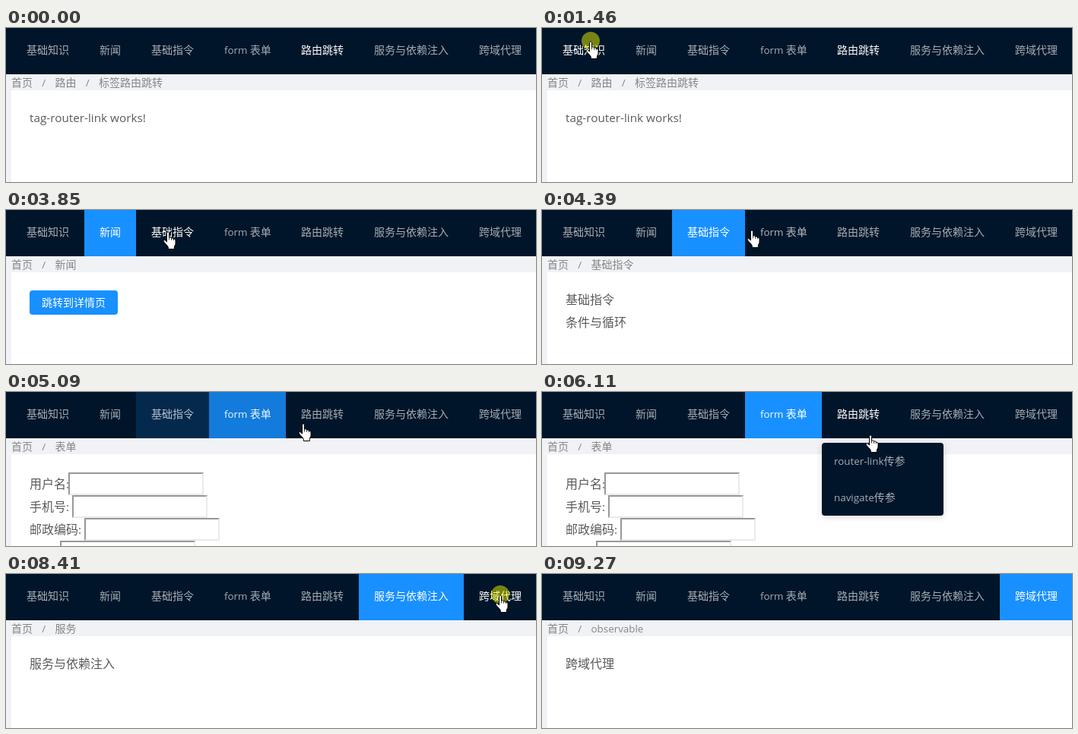
These frames come from a looping animation (697 by 203 pixels, 9.34 s). An HTML page:

```html
<!DOCTYPE html>
<html lang="zh-CN">
<head>
<meta charset="utf-8">
<title>路由跳转</title>
<style>
html, body { margin: 0; width: 100%; height: 100%; overflow: hidden; background: #f0f2f5; }
svg { display: block; }
text { font: 14px "Noto Sans CJK SC", "Noto Sans CJK", sans-serif; white-space: pre; }
.latin { font-family: "Open Sans", "Noto Sans", sans-serif; font-size: .957em; }
.crumb { fill: #000; fill-opacity: .45; }
.body { font-size: 16px; fill: #000; fill-opacity: .65; }
</style>
</head>
<body>
<svg id="stage" width="697" height="203" viewBox="0 0 697 203">
  <rect width="697" height="203" fill="#f0f2f5"/>
  <rect x="7" y="82" width="690" height="121" fill="#fff"/>
  <g id="pages"></g>
  <rect width="697" height="61" fill="#001529"/>
  <g id="menu"></g>
  <g id="drop">
    <rect x="368" y="67" width="160" height="96" rx="4" fill="#001529" style="filter:drop-shadow(0 2px 4px rgba(0,0,0,.15))"/>
  </g>
  <circle id="ring" r="12" fill="#ff0" fill-opacity=".47"/>
  <g id="cursor" fill="#fff" stroke="#000" stroke-width="1" stroke-linejoin="round">
    <g id="hand" transform="translate(-6.5 .3)">
      <path d="M5 2.2C5 .2 8 .2 8 2.2V8C9 7 11 7.4 11 9C12 8.2 13.8 8.6 13.8 10.2C15 9.6 16.5 10.2 16.5 11.8V16C16.5 18 14.8 19 14.8 21V23.2H6.8V21C6.8 19 3 16.5 1 13.6C-.2 11.6 1.8 10.6 3 11.8L5 13.8Z"/>
      <path d="M8 8V11M11 9V11.5M13.8 10.2V12" fill="none" stroke-width=".8"/>
    </g>
    <path id="arrow" d="M0 0V17L4 13.2 6.6 19 9 18 6.5 12.3H12Z"/>
  </g>
</svg>
<script>
const LOOP = 9340, FADE = 230;
const $ = id => document.getElementById(id);

const BURSTS = [
  [380, 1310, 13], [1390, 1850, 7], [2460, 2770, 5], [3310, 3460, 3],
  [3620, 4540, 13], [4690, 5470, 11], [5640, 5790, 2], [6110, 6570, 7],
  [6720, 7190, 7], [7420, 7490, 2], [7660, 7720, 2], [8030, 8260, 4], [8410, 9270, 12]
];

// Menu entries: label, left edge, hover span
const MENU = [
  ['基础知识', 7, 1080, 1690],
  ['新闻', 103, 1620, 3310],
  ['基础指令', 171, 3230, 4310],
  ['form 表单', 267, 4310, 5000],
  ['路由跳转', 368, 5090, 6900],
  ['服务与依赖注入', 464, 6950, 8070],
  ['跨域代理', 602, 8030, 8720]
];

// Selected entry from each time on
const SELECTED = [
  [-999, 4], [1500, 0], [2540, 1], [3900, 2], [4930, 3], [6860, 4], [7490, 5], [8540, 6]
];

// Pointer tip: time, x, y
const PATH = [
  [370, 376, 196], [1310, 64, 17], [1545, 64, 17], [1850, 134, 22],
  [3230, 134, 22], [3460, 213, 22], [3620, 213, 28], [4155, 213, 28],
  [4540, 310, 25], [4920, 310, 25], [5090, 392, 41], [5240, 434, 37],
  [6030, 434, 37], [6110, 432, 56], [6570, 430, 87], [6860, 430, 87],
  [7190, 507, 24], [7960, 507, 24], [8260, 650, 27], [8640, 650, 27], [9230, 672, 206]
];

const CLICKS = [
  [1390, 1460], [2460, 2530], [3690, 3840], [4690, 4840], [5640, 5785],
  [6720, 6860], [7420, 7485], [8410, 8480]
];

const el = (parent, tag, attrs) => {
  const node = document.createElementNS('http://www.w3.org/2000/svg', tag);
  for (const key in attrs) node.setAttribute(key, attrs[key]);
  return parent.appendChild(node);
};

const markup = s => s.replace(/[!-~]+(?: [!-~]+)*/g, m => `<tspan class="latin">${m}</tspan>`);

const label = (parent, str, x, y, attrs) => {
  const node = el(parent, 'text', { x, y, ...attrs });
  node.innerHTML = markup(str);
  return node;
};

const lines = (...rows) => g => rows.forEach((s, i) => label(g, s, 31, 124 + 30 * i, { class: 'body' }));

const newsPage = g => {
  el(g, 'rect', { x: 31, y: 106, width: 116, height: 32, rx: 4, fill: '#1890ff' });
  label(g, '跳转到详情页', 47, 127, { fill: '#fff' });
};

const field = (g, name, x, y) => {
  label(g, name, 31, y + 21, { class: 'body' });
  el(g, 'rect', { x, y, width: 178, height: 30, fill: '#eaeaea' });
  el(g, 'path', { d: `M${x} ${y}h178l-2 2H${x + 2}v26l-2 2z`, fill: '#989898' });
  el(g, 'rect', { x: x + 2, y: y + 2, width: 174, height: 26, fill: '#fff' });
};

const formPage = g => {
  field(g, '用户名:', 82, 106);
  field(g, '手机号:', 87, 136);
  field(g, '邮政编码:', 103, 166);
  field(g, '', 71, 196);
};

const tagPage = lines('tag-router-link works!');

// Start time, breadcrumb after the home link, content
const PAGES = [
  [0, ['路由', '标签路由跳转'], tagPage],
  [1535, ['基础知识'], lines('基础知识', '数据绑定、属性绑定、事件绑定与模板引用的写法', '组件的创建与使用')],
  [2530, ['新闻'], newsPage],
  [3910, ['基础指令'], lines('基础指令', '条件与循环')],
  [4840, ['表单'], formPage],
  [6870, ['路由', '标签路由跳转'], tagPage],
  [7650, ['服务'], lines('服务与依赖注入')],
  [8560, ['observable'], lines('跨域代理')]
].map(([start, trail, draw]) => {
  const g = el($('pages'), 'g', {});
  const crumb = el(g, 'text', { x: 7, y: 77, class: 'crumb' });
  const part = s => `<tspan dx="12.3">${markup(s)}</tspan>`;
  crumb.innerHTML = '首页' + trail.map(s => part('/') + part(s)).join('');
  draw(g);
  return { start, g };
});

const items = MENU.map(([name, x, from, to], i) => {
  const right = i < 6 ? MENU[i + 1][1] : 698;
  const bg = el($('menu'), 'rect', { x, y: 0, width: right - x, height: 61, fill: '#1890ff' });
  const text = label($('menu'), name, x + 20, 34, { fill: '#fff' });
  return { bg, text, from, to };
});

const linkItem = label($('drop'), 'router-link传参', 384, 96, { fill: '#fff' });
label($('drop'), 'navigate传参', 384, 144, { fill: '#fff', 'fill-opacity': .65 });

const clamp = v => Math.max(0, Math.min(1, v));
const ease = p => p < .5 ? 4 * p ** 3 : 1 - 4 * (1 - p) ** 3;
const ramp = (t, start, dur = FADE) => ease(clamp((t - start) / dur));
const span = (t, from, to) => ramp(t, from) - ramp(t, to);
const show = (node, on) => node.setAttribute('visibility', on ? 'inherit' : 'hidden');

function snap(t) {
  let held = 0;
  for (const [a, b, n] of BURSTS) {
    if (t < a) break;
    const dt = (b - a) / (n - 1);
    held = a + dt * Math.min(n - 1, Math.floor((t - a + 3) / dt));
  }
  return held;
}

function tip(t) {
  const i = PATH.findIndex(k => k[0] > t);
  if (i < 1) return null;
  const [a, x0, y0] = PATH[i - 1], [b, x1, y1] = PATH[i];
  let p = (t - a) / (b - a);
  p = p * p * (3 - 2 * p);
  return [Math.round(x0 + (x1 - x0) * p), Math.round(y0 + (y1 - y0) * p)];
}

function render(now) {
  const t = snap(now);

  const page = PAGES.filter(p => t >= p.start).pop();
  PAGES.forEach(p => show(p.g, p === page));

  items.forEach((item, i) => {
    let chosen = 0;
    SELECTED.forEach(([from, id], k) => {
      const to = k + 1 < SELECTED.length ? SELECTED[k + 1][0] : 2 * LOOP;
      if (id === i) chosen += span(t, from, to);
    });
    const white = Math.max(chosen, span(t, item.from, item.to));
    item.bg.setAttribute('fill-opacity', i === 4 ? 0 : chosen);
    item.text.setAttribute('fill-opacity', .65 + .35 * white);
  });

  const open = span(t, 5220, 6860);
  const scale = .8 + .2 * open;
  $('drop').setAttribute('opacity', open);
  $('drop').setAttribute('transform', `translate(0 ${67 * (1 - scale)}) scale(1 ${scale})`);
  linkItem.setAttribute('fill-opacity', .65 + .35 * ramp(t, 6330));

  const pos = tip(t);
  show($('cursor'), pos);
  show($('ring'), pos && CLICKS.some(([a, b]) => t >= a && t < b));
  if (pos) {
    const overMenu = pos[1] < 61 || (t > 5300 && t < 6930);
    show($('hand'), overMenu);
    show($('arrow'), !overMenu);
    $('cursor').setAttribute('transform', `translate(${pos})`);
    $('ring').setAttribute('transform', `translate(${pos})`);
  }
}

const began = performance.now();
function tick() {
  render((performance.now() - began) % LOOP);
  requestAnimationFrame(tick);
}
tick();
</script>
</body>
</html>
```
